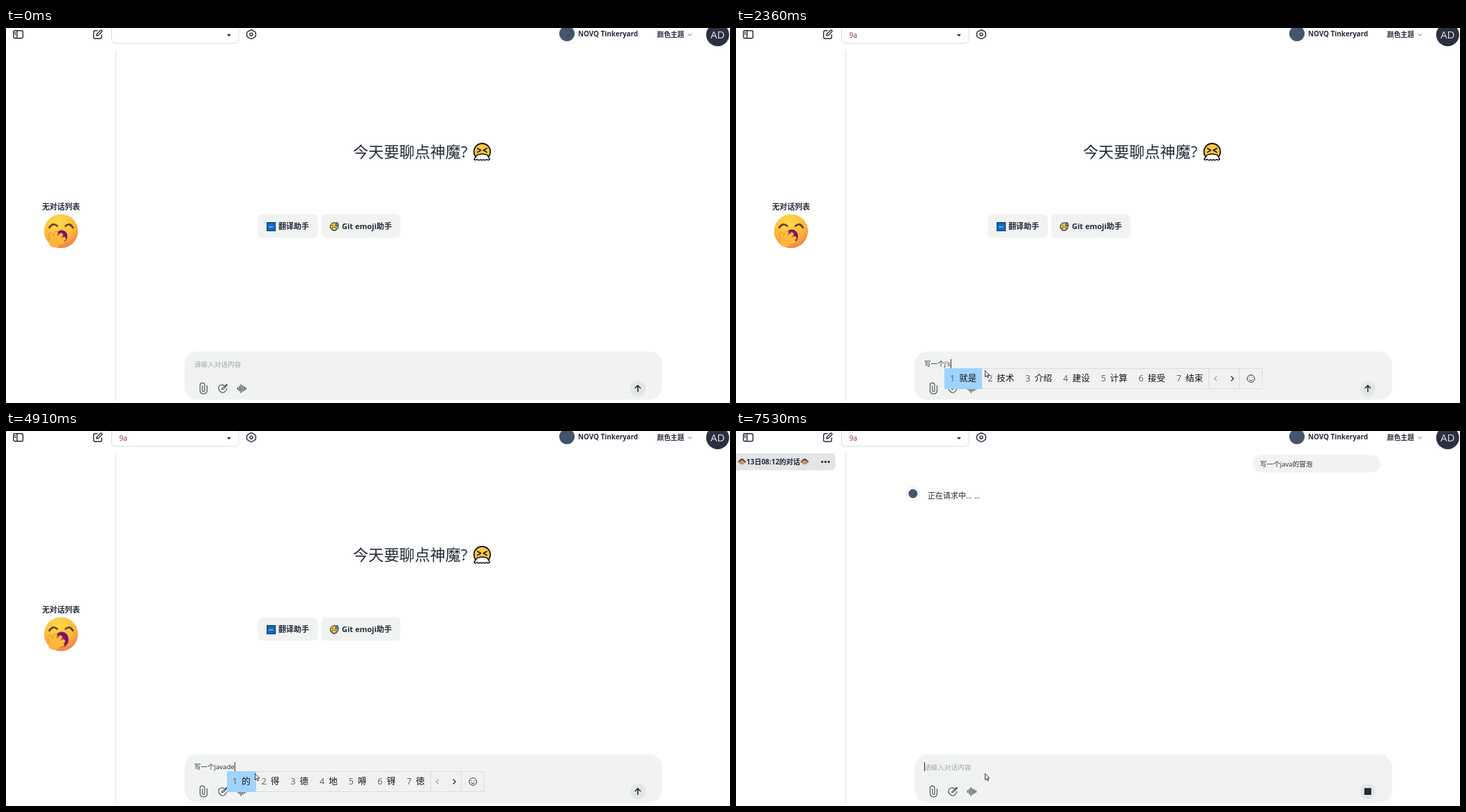
An HTML page that plays this animation: 1039x539 px, repeating every 8000 ms.

```html
<!DOCTYPE html>
<html lang="zh-CN">
<head>
<meta charset="utf-8">
<title>Chat</title>
<style>
html, body { margin: 0; width: 100%; height: 100%; overflow: hidden; background: #fff; }
body { position: relative; font-family: "Open Sans", "Noto Sans CJK SC", "Noto Sans CJK", sans-serif; }
svg { display: block; }
#stage { position: absolute; left: 0; top: 0; }
text { fill: #232b38; white-space: pre; }
.b { font-weight: 700; }
.ln { fill: none; stroke: #222b37; stroke-width: 1.4; stroke-linecap: round; stroke-linejoin: round; }
.gr { stroke: #4f555c; stroke-width: 1.2; }
.off { display: none !important; }

#entry { position: absolute; left: 270px; top: 475px; height: 15px; line-height: 15px; font-size: 9.6px; white-space: pre; color: #232b38; display: flex; align-items: center; }
#caret { width: 1px; height: 13px; background: #333; }

#ime { position: absolute; top: 489px; height: 30px; display: flex; box-sizing: border-box; background: #f0f1f1; box-shadow: inset 0 0 0 1px #dcdddd; font-size: 12.5px; line-height: 30px; color: #111; white-space: pre; }
.cell { padding: 0 8px; display: flex; align-items: center; }
.cell i { font-style: normal; color: #5c6064; margin-right: 6px; }
.cell:first-child { background: #a0d3fc; }
.dot { font-family: "DejaVu Sans", sans-serif; }
#ime .side { border-left: 1px solid #dcdddd; box-sizing: border-box; flex: none; }

#mouse { position: absolute; left: 0; top: 0; animation: move 8s linear infinite; }
#mouse svg { position: absolute; left: -12px; top: -12px; }
@keyframes move {
  0%, 1% { transform: translate(884px, 541px); }
  3% { transform: translate(690px, 517px); }
  5.2% { transform: translate(226px, 284px); }
  6.7% { transform: translate(75px, 95px); }
  7.8% { transform: translate(36px, 38px); }
  9.6% { transform: translate(150px, 16px); }
  10.8%, 17% { transform: translate(186px, 8px); }
  19%, 22.6% { transform: translate(200px, 44px); }
  24% { transform: translate(226px, 200px); }
  25% { transform: translate(310px, 380px); }
  26%, 100% { transform: translate(357px, 492px); }
}
#sneeze { transform-origin: 683px 178px; animation: sneeze .8s linear infinite; }
@keyframes sneeze { 0%, 48%, 82%, 100% { transform: none; } 65% { transform: scale(1.12); } }
#mouth { transform-origin: 80px 298px; animation: yawn 8s ease-in-out infinite; }
@keyframes yawn {
  0%, 42%, 54%, 100% { transform: scale(.9); }
  13%, 16%, 62%, 65% { transform: scale(1.1); }
  29%, 78% { transform: none; }
}
#hand { animation: hand 8s ease-in-out infinite; }
@keyframes hand {
  0%, 42%, 54%, 100% { transform: none; }
  13%, 16%, 62%, 65% { transform: translate(-1px, -1px); }
  29%, 78% { transform: translate(1px, -1px); }
}
</style>
</head>
<body>
<svg id="stage" width="1039" height="539" viewBox="0 0 1039 539">
  <defs>
    <radialGradient id="skin" cx=".42" cy=".25" r=".85">
      <stop offset="0" stop-color="#ffdb4a"/><stop offset=".55" stop-color="#fcbc38"/><stop offset="1" stop-color="#ee6f4f"/>
    </radialGradient>
    <filter id="shade" x="-10%" y="-10%" width="120%" height="120%">
      <feDropShadow dx="0" dy="1" stdDeviation="1.6" flood-opacity=".45"/>
    </filter>
    <g id="monkey">
      <circle cx="-4.2" cy="0" r="1.8" fill="#a8744f"/><circle cx="4.2" cy="0" r="1.8" fill="#a8744f"/>
      <circle r="4.2" fill="#64402c"/>
      <ellipse cy="1.1" rx="3.3" ry="2.8" fill="#e5b48b"/>
      <circle cx="-1.4" cy="0" r=".6"/><circle cx="1.4" cy="0" r=".6"/>
      <path d="M-1.4 2.2h2.8" stroke="#5a3020" stroke-width=".7"/>
    </g>
    <path id="fingers" d="M67 306l-3-9M69 305l3-10M71 306l8-8.500M72 308l11-5M73 310l9-2M66 307l2 3 4-1" fill="none" stroke-linecap="round" stroke-linejoin="round"/>
  </defs>

  <!-- top bar -->
  <g class="ln">
    <rect x="10.7" y="3.7" width="13.6" height="11" rx="2.2"/>
    <path d="M15.8 4v10.5M12.7 6.7h1M12.7 9h1"/>
    <path d="M131 3.7h-3a2.3 2.3 0 0 0-2.3 2.3v7a2.3 2.3 0 0 0 2.3 2.3h7a2.3 2.3 0 0 0 2.3-2.3v-3"/>
    <path d="M130 11l.5-2.6 5-5a1.4 1.4 0 0 1 2 2l-5 5z"/>
    <path d="M350.2 3.4q1.8-1.2 3.6 0l3 1.8q1.6 1 1.6 2.4v3.3q0 1.4-1.6 2.3l-3 1.8q-1.8 1.1-3.6 0l-3-1.8q-1.6-.9-1.6-2.3v-3.3q0-1.4 1.6-2.4z"/>
    <circle cx="352" cy="9.2" r="2.1"/>
  </g>
  <rect id="select" x="151.5" y="-10" width="182.5" height="32" rx="6" fill="#fff" stroke="#d6d8db"/>
  <path d="M317 9h6l-3 3.2z" fill="#222b37"/>
  <text id="model" x="162.5" y="13.5" font-size="10" style="fill:#8c2f2b">9a</text>
  <circle cx="805" cy="8" r="11" fill="#44546a"/>
  <text class="b" x="821" y="12" font-size="9.9">NOVQ Tinkeryard</text>
  <text class="b" x="934.5" y="13" font-size="9.7">颜色主题</text>
  <path class="ln" d="M979 8.7l2.2 2.2 2.2-2.2" style="stroke-width:.9;stroke:#555"/>
  <circle cx="1021.3" cy="9.7" r="16.5" fill="#2b3040"/>
  <text x="1021.3" y="15.3" font-size="15" text-anchor="middle" style="fill:#dcdfe6">AD</text>

  <rect id="menu" x="151.5" y="25" width="182.5" height="112.5" fill="#fff" filter="url(#shade)"/>
  <path d="M157.5 32v504" stroke="#dfe0e1"/>

  <!-- sidebar -->
  <g id="empty">
    <text class="b" x="51.7" y="261" font-size="10.9">无对话列表</text>
    <circle cx="79" cy="292" r="24.3" fill="url(#skin)"/>
    <path d="M62 287q5.500-8 11.500-2.500M85.500 284.500q6-5.500 10.500 2.500" fill="none" stroke="#6b3a2a" stroke-width="2.600" stroke-linecap="round"/>
    <ellipse id="mouth" cx="80" cy="299.5" rx="9" ry="10" fill="#82106a"/>
    <g id="hand">
      <ellipse cx="70" cy="307.5" rx="8.500" ry="8" fill="#fbb238"/>
      <use href="#fingers" stroke="#dc8a2a" stroke-width="6"/>
      <use href="#fingers" stroke="#fdbf40" stroke-width="4.6"/>
      <ellipse cx="70" cy="308" rx="7.5" ry="6.8" fill="#fdb73a"/>
    </g>
  </g>
  <g id="item">
    <rect x="-6" y="32" width="148.5" height="24.5" rx="6" fill="#e4e5e5"/>
    <use href="#monkey" x="8.5" y="44"/><use href="#monkey" x="98.5" y="44"/>
    <text class="b" x="15" y="47.7" font-size="10">13日08:12的对话</text>
    <g id="dots" fill="#222b37"><circle cx="123.7" cy="44.3" r="1.6"/><circle cx="128.4" cy="44.3" r="1.6"/><circle cx="133.1" cy="44.3" r="1.6"/></g>
  </g>

  <!-- welcome -->
  <g id="welcome">
    <text x="498" y="186" font-size="22.1">今天要聊点神魔?</text>
    <g id="sneeze" stroke="#111" stroke-width="1.8" stroke-linecap="round" stroke-linejoin="round">
      <circle cx="683.3" cy="177.7" r="11.7" fill="#ffc83d"/>
      <path d="M676.5 173l5 2.800-5 2.800M690.100 173l-5 2.800 5 2.800" fill="none" stroke-width="1.600"/>
      <path d="M675 184q1-2.500 4-2.200 4.300-1.800 8.600 0 3-.3 4 2.200l2.600 4.800q-2.100 1.900-4.500 0-2.200 2.200-4.500.2-2.200 1.800-4.500 0-2.200 2-4.500-.2-2.200 1.900-4.500 0z" fill="#fff" stroke-width="1.500"/>
    </g>
    <g fill="#f1f2f2"><rect x="361.5" y="268" width="86" height="33.5" rx="6"/><rect x="452.5" y="268" width="113.5" height="33.5" rx="6"/></g>
    <rect x="374.6" y="279.6" width="12" height="12" fill="#0a6cc4" stroke="#0b2c55"/>
    <text x="380.6" y="287" font-size="4" text-anchor="middle" style="fill:#fff">abc</text>
    <text class="b" x="391" y="289.3" font-size="11">翻译助手</text>
    <g stroke="#161616">
      <circle cx="471" cy="285.5" r="5.7" fill="#ffc83d"/>
      <path d="M467.5 287h7q-1 3.5-3.5 3.5t-3.5-3.5z" fill="#fff" stroke-width=".8"/>
      <path d="M467.5 284.5l1.3-1 1.2 1M472 284.5l1.2-1 1.3 1" fill="none" stroke-width=".9"/>
      <path d="M475 279q3 3 2 5-2 1.5-4-.5 0-2 2-4.5z" fill="#34a4ee" stroke-width=".7"/>
    </g>
    <text class="b" x="482" y="289.3" font-size="11">Git emoji助手</text>
  </g>

  <!-- conversation -->
  <g id="chat">
    <rect x="741.5" y="34.5" width="183.5" height="25" rx="12.5" fill="#f1f2f2"/>
    <text x="752" y="50.7" font-size="9.6">写一个java的冒泡</text>
    <circle cx="254" cy="90" r="10" fill="#fff" stroke="#ececec"/>
    <circle cx="254" cy="90" r="6.5" fill="#44546a"/>
    <text x="275" y="97" font-size="11">正在请求中... ...</text>
  </g>

  <!-- message box -->
  <rect x="256.3" y="464.7" width="685.2" height="69.6" rx="18" fill="#f1f3f3"/>
  <text id="hint" x="270" y="486.7" font-size="9.65" style="fill:#a2a7ad">请输入对话内容</text>
  <g class="ln gr">
    <path d="M288.5 514v7.5a5 4.5 0 0 1-10 0v-8.2a3.3 3.1 0 0 1 6.6 0v8a1.7 1.6 0 0 1-3.3 0v-7"/>
    <path d="M313 513.5q-4-1.5-7 1-2.5 4 1 7.5 3 3 5.5 2 4-2.5 4.500-6"/>
    <path d="M309.5 519.5q.5-2.5 2.5-3l4.8-4.3.7.8-4.3 4.8q-1 2-3.7 1.7z"/>
    <path d="M332.5 517v2.5M334.9 515v6.500M337.3 512.7v11.3M339.7 514.5v7.5M342.1 515.7v5M344.3 517.3v2" style="stroke-width:1.5"/>
  </g>
  <circle cx="906.7" cy="518" r="11" fill="#e4e6e6"/>
  <path id="send" class="ln" d="M906.7 522.5v-8.5M903 517.5l3.7-3.7 3.7 3.7" style="stroke-width:1.6"/>
  <rect id="stop" x="901.7" y="513.3" width="10" height="9.8" rx="1" fill="#222b37"/>
</svg>

<div id="entry"><span id="done"></span><span id="comp"></span><span id="caret"></span></div>
<div id="ime"></div>
<div id="mouse">
  <svg width="40" height="40" viewBox="-12 -12 40 40">
    <circle id="halo" cx="0" cy="0" r="8.5" fill="#f7ee4c" opacity=".85"/>
    <path id="arrow" d="M.5 .5v9l2.1-1.9 1.5 3.2 1.4-.7-1.5-3.1h2.9z" fill="#fff" stroke="#222" stroke-width=".9"/>
    <path id="point" d="M-.7 5.5v-5q0-1.2 1-1.2t1 1.2v3l3 .7q1 .4.9 1.5l-.7 4.6h-4.5l-2.6-3.9q.6-1.3 1.9 0z" fill="#fff" stroke="#222" stroke-width=".9"/>
  </svg>
</div>

<script>
const $ = id => document.getElementById(id);
const show = (id, on) => $(id).classList.toggle("off", !on);

const CAT = '<svg width="17" height="16" viewBox="-8.5 -8 17 16"><path d="M-6-6.5l3.5 2h5l3.5-2 .7 7q0 5-6.7 6-6.7-1-6.7-6z" fill="#ffc83d" stroke="#161616" stroke-width="1.2"/><path d="M-2.8-1v1.5M2.8-1v1.5M-2 3q1 1 2 0 1 1 2 0" fill="none" stroke="#161616"/></svg>';
const SIDE = '<svg class="side" width="78" height="30"><g fill="none" stroke-width="1.2"><path d="M11 11.5l-3.5 3.5 3.5 3.5" stroke="#aaa"/><path d="M31.5 11.5l3.5 3.5-3.5 3.5" stroke="#222"/><path d="M43.5 0v30" stroke="#dcdddd" stroke-width="1"/><g stroke="#333" stroke-width="1"><circle cx="60" cy="15" r="5.3"/><path d="M57.5 16.5q2.5 2.8 5 0M58 13v1M62 13v1"/></g></g></svg>';
const glyphs = word => word === "*" ? CAT : `<span>${word.replace(/•/g, '<span class="dot">•</span>')}</span>`;

const TAIL = " 骄傲 教案 急啊 煎熬 建安 吉安";
// [start ms, committed text, composition, candidates]
const steps = [
  [0, "", "", ""],
  [2080, "", "x", "想 下 小 先 写 行 像"],
  [2140, "", "xie'yi", "写一 谢意 协议 鞋 写 些 谢"],
  [2210, "", "xie'yi'ge", "写一个 写一 谢意 协议 写 些 谢"],
  [2280, "写一个", "j", "就 及 级 将 即 加 叫"],
  [2350, "写一个", "j's", "就是 技术 介绍 建设 计算 接受 结束"],
  [2760, "写一个", "j", "就 及 级 将 即 加 叫"],
  [2960, "写一个", "ja", "加 家 价 架 假 甲 佳"],
  [3100, "写一个", "jaa", "加" + TAIL],
  [3240, "写一个", "jaa'v", "加" + TAIL],
  [3410, "写一个", "jaa'va", "加" + TAIL],
  [3620, "写一个", "jaa", "加" + TAIL],
  [3750, "写一个", "ja", "加 家 价 架 假 甲 佳"],
  [3950, "写一个", "jav", "加啊v" + TAIL],
  [4080, "写一个", "java", "Java" + TAIL],
  [4420, "写一个java", "", ""],
  [4700, "写一个java", "d", "的 都 到 大 对 多 点"],
  [4820, "写一个java", "de", "的 得 德 地 嘚 锝 徳"],
  [5050, "写一个java的", "", ""],
  [5320, "写一个java的", "m", "吗 没 们 每 么 面 名"],
  [5400, "写一个java的", "ma", "吗 嘛 妈 马 骂 码 麻"],
  [5520, "写一个java的", "mao", "猫 毛 茂 * o(=•ェ•=)m 冒 帽"],
  [5720, "写一个java的", "mao'p", "冒泡 毛皮 毛坯 猫皮 毛片 名牌 冒牌"],
  [5850, "写一个java的", "mao'pao", "冒泡 毛跑 猫跑 茂跑 毛泡 猫泡 冒跑"],
  [6190, "写一个java的冒泡", "", ""],
  [6720, "", "", ""]
];

let current = -1;
function type(t) {
  let n = steps.length - 1;
  while (steps[n][0] > t) n--;
  if (n === current) return;
  current = n;
  const [, done, comp, list] = steps[n];
  $("done").textContent = done;
  $("comp").textContent = comp;
  show("hint", !done && !comp);
  show("ime", list);
  if (!list) return;
  $("ime").style.left = Math.round(270 + $("done").getBoundingClientRect().width) + "px";
  $("ime").innerHTML = list.split(" ").map((word, i) =>
    `<span class="cell"><i>${i + 1}</i>${glyphs(word)}</span>`).join("") + SIDE;
}

function render(t) {
  const within = (a, b) => t >= a && t < b;
  const open = within(940, 1680), listed = t >= 6720, sent = t >= 6860;
  const over = within(800, 1810);
  show("menu", open);
  $("select").setAttribute("stroke", open ? "#a9acb0" : "#d6d8db");
  $("select").setAttribute("stroke-width", open ? 2 : 1);
  show("model", t >= 1680);
  show("halo", within(940, 1210) || within(1610, 1740));
  show("point", over);
  show("arrow", !over);
  show("empty", !listed);
  show("item", listed);
  show("dots", sent);
  show("welcome", !sent);
  show("chat", sent);
  show("send", !sent);
  show("stop", sent);
  show("caret", within(2080, 6790) || t >= 7530);
  type(t);
}

let start;
function tick(now) {
  start ??= now;
  render((now - start) % 8000);
  requestAnimationFrame(tick);
}
render(0);
requestAnimationFrame(tick);
</script>
</body>
</html>
```
